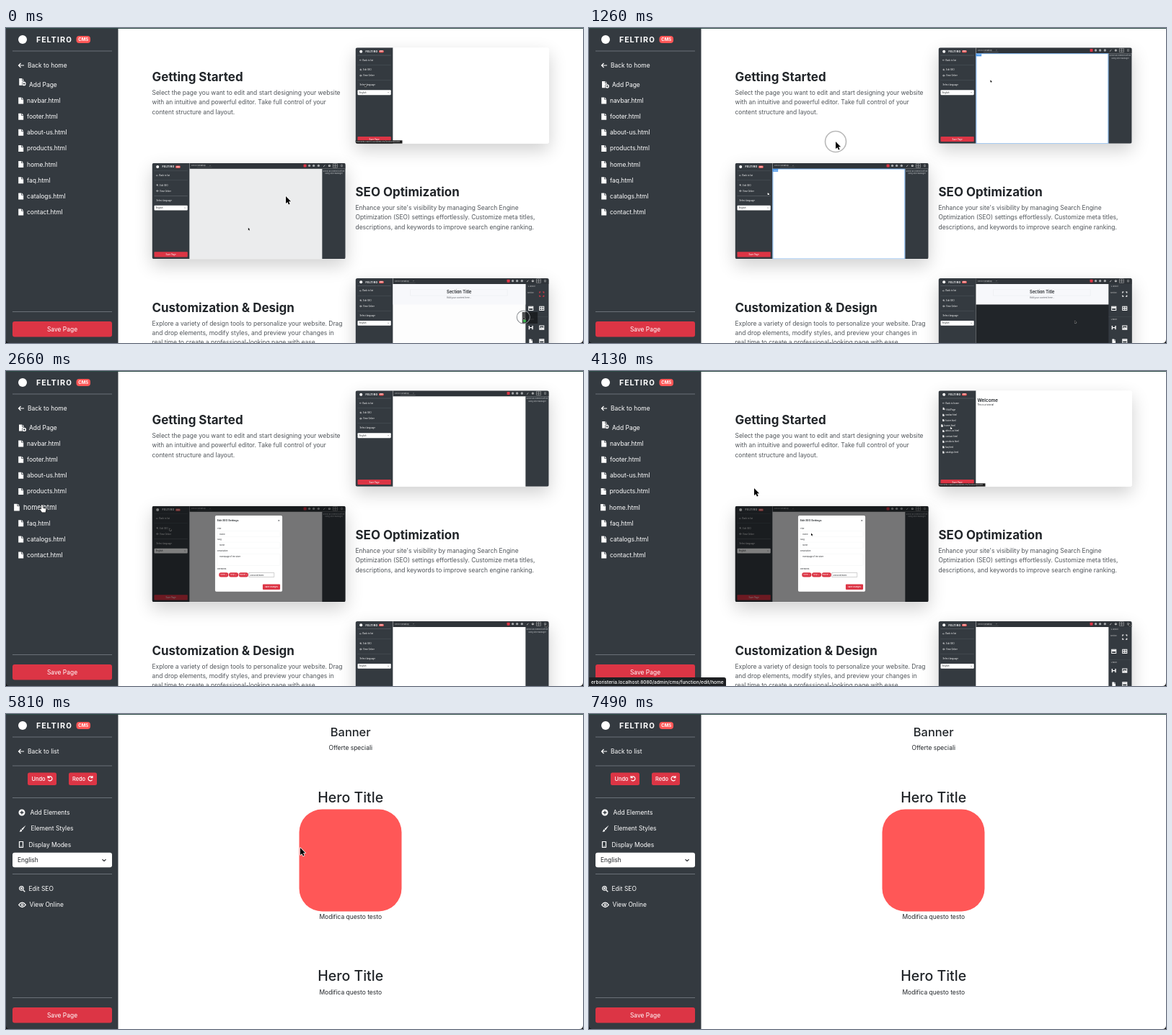
These frames come from a looping animation (800x438 px, 8000 ms). An HTML page with a canvas:

```html
<!DOCTYPE html>
<html lang="en">
<head>
<meta charset="utf-8">
<title>Page editor</title>
<style>
html, body { margin: 0; width: 100%; height: 100%; overflow: hidden; background: #fff }
canvas { display: block; width: 800px; height: 438px }
</style>
</head>
<body>
<canvas id="stage"></canvas>
<script>
const canvas = document.getElementById('stage');
const c = canvas.getContext('2d');
const dpr = window.devicePixelRatio || 1;
canvas.width = 800 * dpr;
canvas.height = 438 * dpr;

const LOOP = 8000, STEP = 70, MINI = 0.335;
const SIDE = '#343a40', RED = '#dc3545', CORAL = '#ff5757', INK = '#212529', GREY = '#50555a';

const icons = {
  back: 'M4 0H-3.5M-.5-3L-3.5 0L-.5 3',
  file: 'M-3.5-4.5H.5V-1.5H3.5V4.5H-3.5ZM1.2-4.5L3.5-2.2H1.2Z',
  plus: 'M0-4.5A4.5 4.5 0 1 1 0 4.5A4.5 4.5 0 1 1 0-4.5ZM-.7-2.5V-.7H-2.5V.7H-.7V2.5H.7V.7H2.5V-.7H.7V-2.5Z',
  brush: 'M4.5-4.5L0 2.2L-1.8 .6ZM-2.2 1.2L-.6 2.7Q-1.2 4.8-4.5 4.5Q-3.3 3.6-3.3 2.4Q-3 1.2-2.2 1.2Z',
  phone: 'M-2.5-4H2.5V4H-2.5ZM-.7 2.5H.7',
  zoom: 'M2.2-.6A2.8 2.8 0 1 1-3.4-.6A2.8 2.8 0 1 1 2.2-.6ZM1.5 1.5L4.3 4.2M-2-.6H.8M-.6-2V.8',
  eye: 'M-4.8 0Q0-6.5 4.8 0Q0 6.5-4.8 0ZM0-1.3A1.3 1.3 0 1 1 0 1.3A1.3 1.3 0 1 1 0-1.3Z',
  redo: 'M2.2-2.2A3 3 0 1 0 2.6 1.5M2.9-4V-1.4H.3',
  undo: 'M-2.2-2.2A3 3 0 1 1-2.6 1.5M-2.9-4V-1.4H-.3',
  chevron: 'M-2.5-1.2L0 1.2L2.5-1.2',
  corners: 'M-9-4V-9H-4M4-9H9V-4M9 4V9H4M-4 9H-9V4',
  panel: 'M-9-8H9V8H-9ZM-9-4H9M-9-1H9',
  grid: 'M-9-8H9V8H-9ZM0-8V8M-9 0H9',
  heading: 'M-7-8V8M7-8V8M-7 0H7',
  image: 'M-9-8H9V8H-9ZM-7 6L-2-1L1 3L4 0L7 6Z',
  arrow: 'M0 0V10L2.3 7.9L3.9 11.5L5.6 10.7L4 7.3H7.1Z',
  hand: 'M-1 1.2Q-1 0 0 0T1 1.2V4.4L4.4 5.2Q5.6 5.6 5.4 7L4.7 10.6H0L-3 6.6Q-3.6 5.2-2.2 5.5L-1 6.6Z'
};
for (const name in icons) icons[name] = new Path2D(icons[name]);
const SOLID = ['file', 'plus', 'brush'];

function text(s, x, y, color = '#fff', size = 8.45, weight = 400, align = 'left', family = 'Inter') {
  c.font = `${weight} ${size}px ${family}, sans-serif`;
  c.textAlign = align;
  c.fillStyle = color;
  c.fillText(s, x, y);
}
function box(x, y, w, h, color, r = 0) {
  c.fillStyle = color;
  c.beginPath();
  c.roundRect(x, y, w, h, r);
  c.fill();
}
function dot(x, y, r, color) { box(x - r, y - r, 2 * r, 2 * r, color, r); }
function outline(x, y, w, h, color, r = 0, line = 1) {
  c.strokeStyle = color;
  c.lineWidth = line;
  c.beginPath();
  c.roundRect(x, y, w, h, r);
  c.stroke();
}
function at(x, y, sx, sy, draw) {
  c.save();
  c.translate(x, y);
  c.scale(sx, sy);
  draw();
  c.restore();
}
function icon(name, x, y, color = '#fff', line = 1.2) {
  at(x, y, 1, 1, () => {
    c.fillStyle = c.strokeStyle = color;
    c.lineWidth = line;
    if (SOLID.includes(name)) c.fill(icons[name], 'evenodd');
    else c.stroke(icons[name]);
  });
}
function pointer(name, x, y) {
  at(x, y, 1, 1, () => {
    c.lineJoin = 'round';
    c.lineWidth = name == 'hand' ? 0.9 : 1.4;
    c.strokeStyle = name == 'hand' ? '#000' : '#fff';
    c.fillStyle = name == 'hand' ? '#fff' : '#000';
    c.stroke(icons[name]);
    c.fill(icons[name]);
  });
}

// Eased position along [time, x, y] stops
function along(stops, t) {
  let i = stops.findIndex(s => s[0] > t);
  if (i < 0) i = stops.length;
  const a = stops[Math.max(i - 1, 0)], b = stops[Math.min(i, stops.length - 1)];
  const p = b[0] > a[0] ? (t - a[0]) / (b[0] - a[0]) : 0, e = p * p * (3 - 2 * p);
  return [a[1] + (b[1] - a[1]) * e, a[2] + (b[2] - a[2]) * e];
}

const mouse = t => along([[0, 388, 234], [700, 362, 184], [1190, 342, 158], [1450, 342, 158], [2060, 150, 231],
  [2100, 104, 232], [2400, 56, 192], [2660, 50, 186], [3800, 50, 186], [4130, 229, 163], [4500, 300, 168],
  [5600, 400, 189], [5810, 408, 186], [6230, 414, 190], [6720, 414, 190], [7420, 440, -16]], t);

const pages = ['navbar', 'footer', 'about-us', 'products', 'home', 'faq', 'catalogs', 'contact'];
const miniPages = ['navbar', 'footer', 'home', 'about-us', 'contact', 'products', 'faq', 'catalogs'];
const rowY = i => 101 + 22.15 * i;

function hovered(i, t) {
  const [x, y] = mouse(t);
  return x > 9 && x < 147 && Math.abs(y + 2 - rowY(i)) < 11;
}
// Linear 250 ms transition as a running average
function hoverAmount(i, t) {
  let sum = 0;
  for (let k = 0; k < 10; k++) sum += hovered(i, t - 25 * k);
  return sum / 10;
}

function rule(y) { box(9, y - 0.5, 138, 1, '#6a7178'); }
function item(name, label, y, iconX = 22, labelX = 31.5) {
  icon(name, iconX, y);
  text(label, labelX, y + 3);
}
function sidebar(height, saveY, back) {
  box(0, 0, 155.5, height, SIDE);
  dot(23, 16, 6, '#fff');
  c.letterSpacing = '1.2px';
  text('FELTIRO', 42, 20, '#fff', 11, 700, 'left', 'Roboto');
  c.letterSpacing = '0px';
  box(97.5, 11, 19.5, 10, CORAL, 4);
  text('CMS', 107.2, 18.3, '#fff', 6, 700, 'center');
  rule(32);
  item('back', back, 52, 21, 30);
  box(9, saveY, 138, 21.5, RED, 3);
  text('Save Page', 78, saveY + 14, '#fff', 8.45, 400, 'center');
}
function select(y) {
  box(9, y, 138, 20.5, '#fff', 3);
  text('English', 16, y + 13.3, INK);
  icon('chevron', 136, y + 10.5, INK);
}
function pageList(names, t, amount) {
  // Bouncing icon, one second per cycle
  const p = (t / 1000 + 0.23) % 1;
  const rise = p > 0.1 && p < 0.5 ? Math.sin((p - 0.1) / 0.4 * Math.PI) : p > 0.5 && p < 0.64 ? 0.25 * Math.sin((p - 0.5) / 0.14 * Math.PI) : 0;
  at(21.5, 79 - 4.8 * rise, 1 - 0.08 * rise, 1 + 0.08 * rise, () => {
    icon('file', 0, 0);
    dot(3.8, 2.4, 3.2, SIDE);
    at(3.8, 2.4, 0.6, 0.6, () => icon('plus', 0, 0));
  });
  text('Add Page', 32, 82);
  names.forEach((name, i) => {
    const s = 1 + 0.1 * amount(i);
    at(78, rowY(i), s, s, () => {
      icon('file', -57.3, 0);
      text(name + '.html', -49, 3);
    });
  });
}

// Miniature editor, 800 x 398 units
function miniEditor({ loading, blank, paper = '#fff', frame, tools }) {
  sidebar(398, 369, 'Back to list');
  rule(72);
  item('zoom', 'Edit SEO', 92);
  item('eye', 'View Online', 116);
  rule(136);
  text('Select language', 18, 158);
  select(176);
  box(155.5, 0, 645, 398, paper);
  if (loading) return;
  box(155.5, 0, 645, 24, '#2f3439');
  text('Device', 162, 14, '#bbb', 8);
  text('Desktop', 190, 14, '#ddd', 8);
  icon('chevron', 240, 11, '#bbb');
  box(186, 18, 62, 1, '#777');
  [633, 651, 669, 689, 713, 734, 758, 785].forEach((x, i) => {
    if (i == 0) box(x - 6, 5, 12, 12, RED, 2);
    else if (i < 4) dot(x, 11, 5, '#a5a8ab');
    else icon(['brush', 'plus', 'grid', 'phone'][i - 4], x, 11, '#ddd');
  });
  box(704, 24, 96, 374, SIDE);
  if (tools) toolPanel(tools == 'drag');
  else {
    text('Select an element before', 752, 36, '#c4c7ca', 7.5, 400, 'center');
    text('using Style Manager', 752, 47, '#c4c7ca', 7.5, 400, 'center');
  }
  if (frame) {
    outline(156.5, 25, 546, 373, '#3b8ee8', 0, 2);
    box(156, 25, 22, 11, '#3b8ee8');
    text('Body', 160, 33, '#fff', 7);
  }
}
function toolPanel(active) {
  text('▾ Layout', 714, 36, '#ccc', 7.5);
  text('Section', 725, 62, '#ccc', 7.5, 400, 'center');
  icon('corners', 771, 66, active ? RED : '#fff', 3);
  icon('panel', 726, 125, '#fff', 3);
  icon('grid', 771, 125, '#fff', 3);
  box(704, 158, 96, 1, '#555b61');
  text('▾ Basic', 714, 174, '#ccc', 7.5);
  icon('heading', 726, 205, '#fff', 4);
  icon('image', 771, 205, '#fff', 3);
  at(726, 261, 2, 2, () => icon('file', 0, 0));
  icon('panel', 771, 261, '#fff', 3);
}
function miniStatus() {
  box(0, 385, 194, 13, '#1c1c1c');
  text('erboristeria.localhost:8080/admin/cms/function/edit/home', 3, 394, '#ddd', 6.5);
}
function modal() {
  box(0, 0, 800, 398, 'rgba(0,0,0,.5)');
  box(261, 40, 278, 315, '#fff', 5);
  text('Edit SEO Settings', 270, 64, INK, 10.5, 600);
  text('×', 520, 63, INK, 14);
  [['Title', 'Home', 95], ['Slug', 'home', 142], ['Description', 'Homepage of the store', 190]].forEach(([label, value, y]) => {
    text(label, 270, y, INK, 8);
    outline(270, y + 9, 260, label == 'Description' ? 48 : 24, '#eceef0', 3);
    text(value, 279, y + 24, INK, 8);
  });
  text('Keywords', 270, 265, INK, 8);
  ['home ×', 'shop ×', 'market ×'].forEach((word, i) => {
    box(277 + i * 41, 276, 39, 19, RED, 8);
    text(word, 296 + i * 41, 288, '#fff', 7.5, 400, 'center');
  });
  outline(401, 277, 104, 18, '#777');
  text('Add a keyword', 405, 289, INK, 8);
  box(458, 325, 72, 22, RED, 3);
  text('Save changes', 494, 339, '#fff', 8, 500, 'center');
}

function card(x, y, draw) {
  c.save();
  c.shadowColor = 'rgba(0,0,0,.19)';
  c.shadowBlur = 24 * dpr;
  c.shadowOffsetY = 9 * dpr;
  box(x, y, 268.5, 133.5, '#fff', 3);
  c.restore();
  c.save();
  c.beginPath();
  c.roundRect(x, y, 268.5, 133.5, 3);
  c.clip();
  at(x, y, MINI, MINI, draw);
  c.restore();
}

function startClip(t) {
  if (t > 3350 && t < 4900) {
    sidebar(398, 369, 'Back to home');
    pageList(miniPages, t, i => i == 2 ? 1 : 0);
    box(155.5, 0, 645, 398, '#fff');
    text('Welcome', 161, 47, INK, 19, 600);
    text('This is a tutorial', 161, 63, INK, 9);
    miniStatus();
    pointer('hand', 51, 149);
    return;
  }
  const loading = t < 560 || t >= 4900;
  miniEditor({ loading, frame: !loading && t < 2380 });
  if (loading) miniStatus();
  if (t < 2380 || loading) pointer('arrow', ...along([[0, 39, 152], [560, 90, 140], [1260, 215, 134], [2100, 355, 209], [2380, 380, 220], [4900, 51, 149], [5500, 39, 152]], t));
}
function seoClip(t) {
  const white = t > 620 && t < 1750, open = t > 2380;
  miniEditor({ paper: white ? '#fff' : '#ebeced', frame: white });
  if (open) modal();
  else if (t > 1750) miniStatus();
  const shape = !open && t > 1000 ? 'hand' : 'arrow';
  pointer(shape, ...along([[0, 398, 269], [600, 330, 220], [1260, 136, 122], [1950, 55, 87], [2380, 60, 88], [2660, 73, 93], [3300, 200, 100], [4130, 315, 113], [5500, 330, 116]], t));
}
function designClip(t) {
  const drag = t < 560, section = t < 2450, empty = !section && t < 3400;
  miniEditor({ paper: section && !drag ? INK : drag ? '#fdfdfd' : '#fff', tools: empty ? '' : drag ? 'drag' : 'open' });
  if (section) {
    box(155.5, 24, 548.5, 85, '#f7f8fb');
    outline(227, 46, 402, 26, '#dfe2e6');
    text('Section Title', 429, 64, INK, 17, 600, 'center');
    text('Add your content here...', 429, 84, GREY, 9, 400, 'center');
  }
  if (drag) {
    box(690, 140, 64, 48, 'rgba(20,22,24,.75)');
    outline(668, 134, 54, 54, '#8b8f93', 27, 3);
    dot(700, 177, 6, '#35b34a');
  }
  if (t < 1850 || !section) pointer('arrow', ...along([[0, 695, 161], [560, 620, 170], [1260, 564, 176], [1850, 600, 150], [2450, 786, 14], [4130, 790, 10]], t));
}

function article(title, lines, x, y) {
  text(title, x, y, INK, 16.95, 700);
  lines.forEach((line, i) => text(line, x, y + 19 + 13.3 * i, GREY));
}
function homePage(t) {
  sidebar(438, 408, 'Back to home');
  pageList(pages, t, i => hoverAmount(i, t));
  rule(394.5);
  article('Getting Started', ['Select the page you want to edit and start designing your website',
    'with an intuitive and powerful editor. Take full control of your', 'content structure and layout.'], 202.5, 74);
  article('SEO Optimization', ["Enhance your site's visibility by managing Search Engine",
    'Optimization (SEO) settings effortlessly. Customize meta titles,',
    'descriptions, and keywords to improve search engine ranking.'], 484.5, 234);
  article('Customization & Design', ['Explore a variety of design tools to personalize your website. Drag',
    'and drop elements, modify styles, and preview your changes in',
    'real time to create a professional-looking page with ease.'], 202.5, 394.5);
  card(484.5, 27.3, () => startClip(t));
  card(202.5, 187.7, () => seoClip(t));
  card(484.5, 348, () => designClip(t));
  if (t > 3150 && t < 4480) {
    box(0, 426, 190, 12, '#1e2023', [0, 3, 0, 0]);
    text('erboristeria.localhost:8080/admin/cms/function/edit/home', 3, 435, '#fff', 6.5, 500);
  }
}
function editorPage() {
  sidebar(438, 408, 'Back to list');
  [72, 116.5, 222.5, 394.5].forEach(rule);
  box(30, 81.5, 40, 17.5, RED, 2.5);
  text('Undo', 35.5, 93, '#fff', 7.4, 500);
  icon('undo', 61, 90);
  box(87, 81.5, 39, 17.5, RED, 2.5);
  text('Redo', 92, 93, '#fff', 7.4, 500);
  icon('redo', 117, 90);
  item('plus', 'Add Elements', 137, 22, 33.5);
  item('brush', 'Element Styles', 159.3, 23, 34.5);
  item('phone', 'Display Modes', 181.5, 21);
  select(192.8);
  item('zoom', 'Edit SEO', 243);
  item('eye', 'View Online', 265.3, 22.5, 32.5);
  const centered = (s, y, size, weight) => text(s, 477.7, y, INK, size, weight, 'center');
  centered('Banner', 31, 16.4, 500);
  centered('Offerte speciali', 49.5);
  centered('Hero Title', 122.7, 19.5, 500);
  box(406.5, 132.5, 142, 142, CORAL, 32);
  centered('Modifica questo testo', 284.5);
  centered('Hero Title', 370.7, 19.5, 500);
  centered('Modifica questo testo', 390);
}

function draw(now) {
  const loopTime = now % LOOP, t = loopTime - loopTime % STEP;
  c.setTransform(dpr, 0, 0, dpr, 0, 0);
  box(0, 0, 800, 438, '#fff');
  const home = t < 5530;
  if (home) homePage(t);
  else editorPage();
  box(0, 0, 800, 1, '#2b4a45');

  c.fillStyle = '#111';
  c.fill(new Path2D('M0 433V438H5Q0 438 0 433ZM800 433V438H795Q800 438 800 433Z'));

  const [x, y] = mouse(t);
  if (t > 1150 && t < 1400) {
    dot(x, y, 15, 'rgba(255,255,255,.8)');
    outline(x - 14.5, y - 14.5, 29, 29, '#b9b9b9', 14.5, 1.6);
  }
  pointer(home && pages.some((_, i) => hovered(i, t)) ? 'hand' : 'arrow', x, y);
  requestAnimationFrame(draw);
}
requestAnimationFrame(draw);
</script>
</body>
</html>
```
